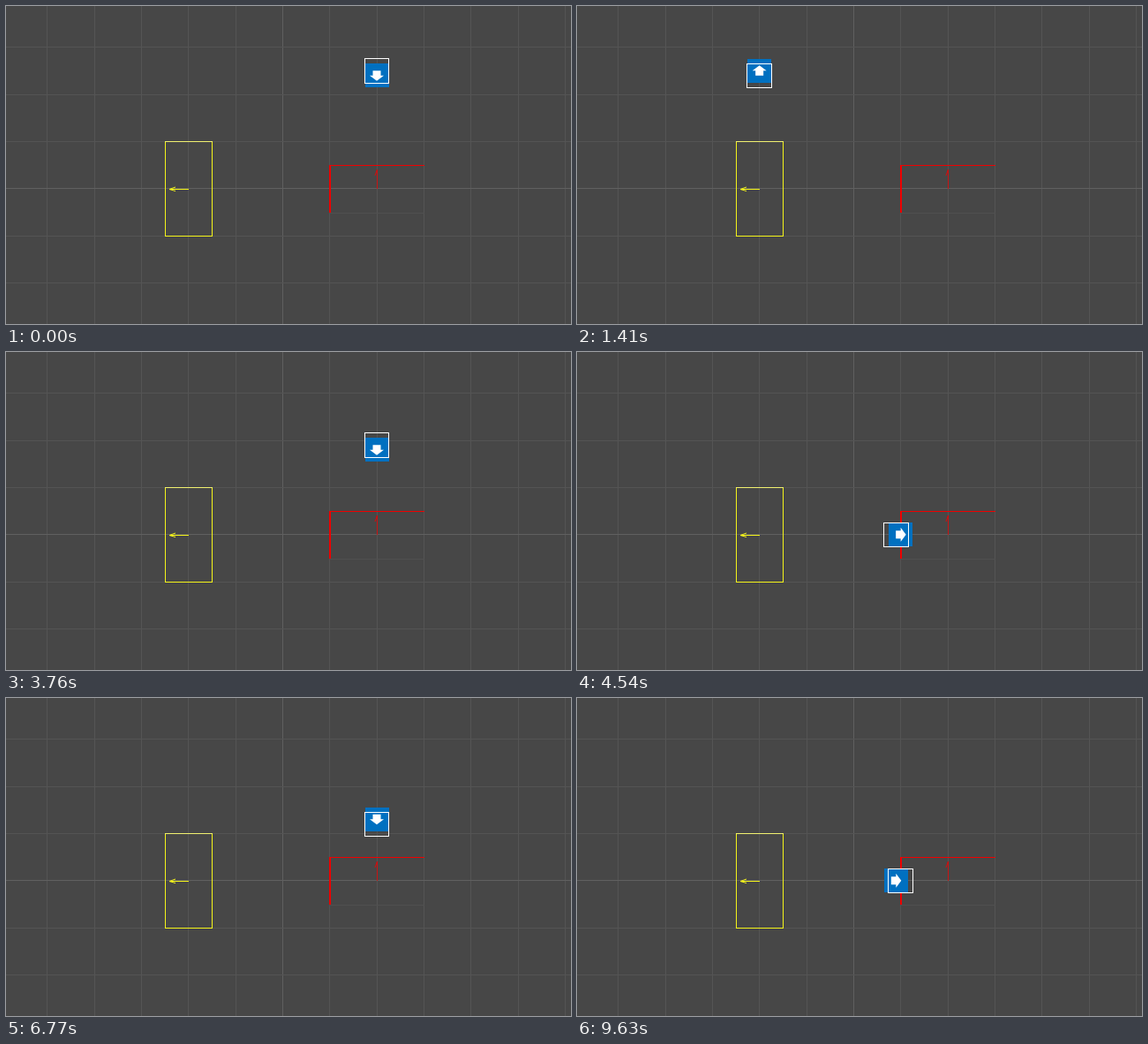
An HTML page with a canvas for the animation above (9730 ms loop, 640x360 px).

```html
<!DOCTYPE html>
<html lang="en">
<head>
<meta charset="utf-8">
<title>Portals</title>
<style>
html, body { margin: 0; width: 100%; height: 100%; overflow: hidden; background: #474747; }
canvas { display: block; width: 640px; height: 360px; }
</style>
</head>
<body>
<canvas id="stage" width="640" height="360"></canvas>
<script>
const ctx = document.getElementById("stage").getContext("2d");
const LOOP = 9730, TICK = 60, UNIT = 160 / 3, LAG = 0.1;
const MID = 620 / 3;              // height of both portals, and x of the yellow one
const YELLOW = { x: MID, y: MID }, RED = { x: 420, y: MID };
const DOWN = Math.PI / 2, RIGHT = 0, UP = -Math.PI / 2;

// Each run: direction, then [time, distance along the route]
const runs = [
  { back: false, keys: [[0, -2.2], [360, 0.2], [960, 3.8], [990, 4], [1410, 6.7], [1470, 7.1], [1530, 7.3]] },
  { back: true, keys: [[1710, -2.1], [2070, 0.3], [2790, 4.5], [2850, 4.7], [3270, 7.4], [3330, 7.6]] },
  { back: false, keys: [[3640, -2.4], [3760, -1.6], [4060, 0.4], [4600, 3.5], [4660, 3.7], [5140, 6.9], [5200, 7.1]] },
  { back: true, keys: [[5480, -2], [5840, 0.4], [6530, 4.5], [6590, 4.9], [6770, 6], [6890, 6.8], [6950, 6.9]] },
  { back: false, keys: [[7350, -1.7], [7650, 0.3], [8160, 3.3], [8220, 3.7], [8280, 4], [8760, 7.1], [8820, 7.3]] },
  { back: true, keys: [[9030, -2.1], [9390, 0.3], [9630, 1.8]] }
];
// Moments where the 60 ms rhythm restarts
const beats = [0, 990, 1710, 2400, 2430, 3640, 5480, 6170, 7350, 7920, 9030];

function snapTime(t) {
  const start = beats.filter(b => b <= t).pop();
  return start + Math.floor((t - start) / TICK) * TICK;
}

function distance(keys, t) {
  const i = keys.findIndex(k => k[0] > t);
  if (i < 0) return keys[keys.length - 1][1];
  const [t0, d0] = keys[i - 1], [t1, d1] = keys[i];
  return Math.round((d0 + (d1 - d0) * (t - t0) / (t1 - t0)) * 10) / 10;
}

// Box position and the way it travels; dx, dy are in units, y downwards
function place(d, back) {
  const at = (portal, x, y, dx, dy, angle) =>
    ({ x: portal.x + x * UNIT, y: portal.y + y * UNIT, dx, dy, angle });
  if (back) {
    if (d <= 0) return at(YELLOW, 0, d - 0.7, 0, 1, UP);
    if (d <= 4.5) return at(RED, 0.7 - d, 0, -1, 0, RIGHT);
    return at(RED, 0, 4.7 - d, 0, -1, DOWN);
  }
  if (d <= 0) return at(RED, 0, d - 0.2, 0, 1, DOWN);
  if (d <= 3.5) return at(YELLOW, d - 0.2, 0, 1, 0, RIGHT);
  return at(YELLOW, 0, 4.2 - d, 0, -1, UP);
}

function fill(color, x, y, w, h) {
  ctx.fillStyle = color;
  ctx.fillRect(x, y, w, h);
}

function frame(color, l, t, r, b) {
  ctx.strokeStyle = color;
  ctx.lineWidth = 1;
  ctx.strokeRect(l + 0.5, t + 0.5, r - l, b - t);
}

function path(color, points) {
  ctx.strokeStyle = color;
  ctx.lineWidth = 1;
  ctx.beginPath();
  points.forEach(([x, y]) => ctx.lineTo(x, y));
  ctx.stroke();
}

function drawGrid() {
  fill("#474747", 0, 0, 640, 360);
  for (let i = 0; i < 12; i++) {
    fill(i === 5 ? "#606060" : "#545454", Math.floor((i + 0.875) * UNIT), 0, 1, 360);
  }
  for (let i = 0; i < 6; i++) {
    fill(i === 3 ? "#606060" : "#545454", 0, Math.round((i + 0.875) * UNIT - 0.2), 640, 1);
  }
}

function drawPortals() {
  frame("#f4f41a", 180, 153, 233, 260);
  fill("#f0f070", 180, 153, 54, 1);
  path("#f4f41a", [[207, 207.5], [185, 207.5]]);
  path("#f4f41a", [[192, 205], [185, 207.5], [192, 209.5]]);

  fill("#505050", 366, 234, 108, 1);
  fill("#f00000", 366, 180, 108, 1);
  fill("#f00000", 366, 180, 2, 54);
  fill("#c81414", 420, 185, 1, 22);
  path("#e00808", [[418, 192], [420.5, 185]]);
}

function drawBox(p, moving) {
  const half = UNIT / 4;
  fill("#0070c0", Math.round(p.x - half), Math.round(p.y - half), 27, 27);

  ctx.save();
  ctx.translate(p.x, p.y);
  ctx.rotate(p.angle);
  ctx.fillStyle = "#fff";
  ctx.beginPath();
  [[-5.5, -4.5], [0, -4.5], [0, -8], [6, 0], [0, 8], [0, 4.5], [-5.5, 4.5]]
    .forEach(([x, y]) => ctx.lineTo(x, y));
  ctx.fill();
  ctx.restore();

  // The outline trails the box by one small step
  const lag = moving ? LAG * UNIT : 0;
  const x = p.x - p.dx * lag, y = p.y - p.dy * lag;
  frame("#fff", Math.floor(x - half - 0.4), Math.ceil(y - half - 0.01) - 1,
    Math.round(x + half), Math.round(y + half));
}

function draw(now) {
  const t = snapTime(now % LOOP);
  const run = runs.filter(r => r.keys[0][0] <= t).pop();
  const isLast = run === runs[runs.length - 1];
  const end = run.keys[run.keys.length - 1][0];
  drawGrid();
  drawPortals();
  drawBox(place(distance(run.keys, t), run.back), isLast || t < end);
}

const start = performance.now();
function tick() {
  draw(performance.now() - start);
  requestAnimationFrame(tick);
}
tick();
</script>
</body>
</html>
```
